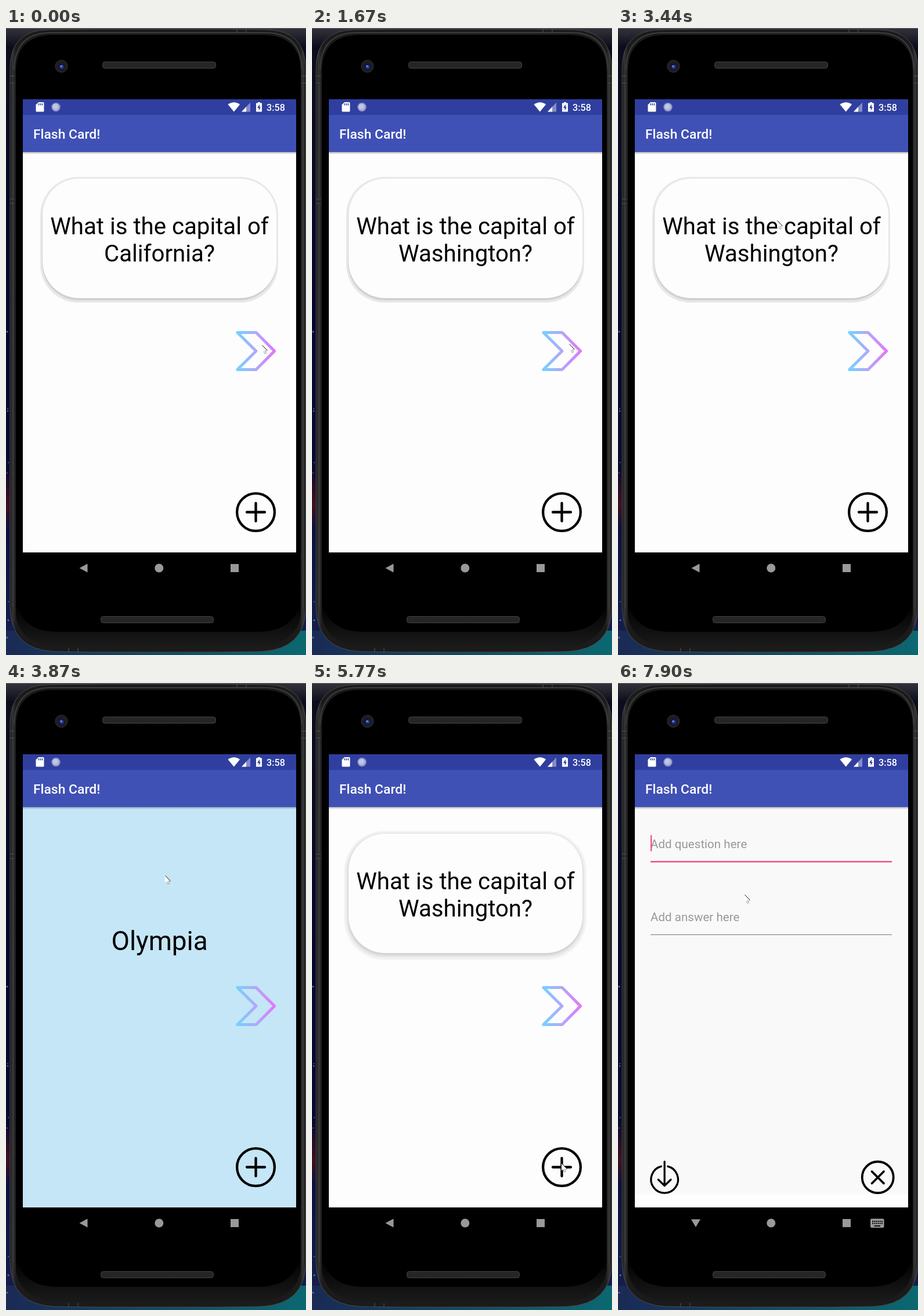
Animation, 517 px wide and 1082 px high, one loop 8 s. Source, as an HTML page:

```html
<!DOCTYPE html>
<html lang="en">
<head>
<meta charset="utf-8">
<title>Flash Card</title>
<style>
  html, body { margin: 0; width: 100%; height: 100%; overflow: hidden; background: #000; }
  svg { display: block; width: 100vw; height: 100vh; }
  text { font-family: Roboto, sans-serif; }
  .bold { font-weight: 500; fill: #fff; }
  .mid { text-anchor: middle; }
  .line { fill: none; stroke: #000; stroke-linecap: round; stroke-linejoin: round; }
</style>
</head>
<body>
<svg viewBox="0 0 517 1082" preserveAspectRatio="none">
  <defs>
    <linearGradient id="sky" x2="0" y2="1">
      <stop offset="0" stop-color="#33343a"/><stop offset=".03" stop-color="#0c0d1c"/>
      <stop offset=".45" stop-color="#06072c"/><stop offset=".7" stop-color="#080a30"/>
      <stop offset=".76" stop-color="#40101f"/><stop offset=".8" stop-color="#0b1040"/>
      <stop offset="1" stop-color="#17204f"/>
    </linearGradient>
    <linearGradient id="teal">
      <stop offset="0" stop-color="#1a2a55"/><stop offset="1" stop-color="#0b6870"/>
    </linearGradient>
    <linearGradient id="rim">
      <stop offset="0" stop-color="#151515"/><stop offset=".008" stop-color="#353535"/>
      <stop offset=".02" stop-color="#1b1b1b"/><stop offset=".98" stop-color="#1b1b1b"/>
      <stop offset=".992" stop-color="#353535"/><stop offset="1" stop-color="#151515"/>
    </linearGradient>
    <linearGradient id="chin" x2="0" y2="1">
      <stop offset="0" stop-color="#000"/><stop offset="1" stop-color="#1b1b1b"/>
    </linearGradient>
    <linearGradient id="drop" x2="0" y2="1">
      <stop offset="0" stop-color="#000" stop-opacity=".3"/><stop offset="1" stop-color="#000" stop-opacity="0"/>
    </linearGradient>
    <linearGradient id="next" gradientUnits="userSpaceOnUse" x1="397" x2="465" y1="0" y2="0">
      <stop offset="0" stop-color="#74d3fc"/><stop offset=".5" stop-color="#b0a8fb"/><stop offset="1" stop-color="#e474fb"/>
    </linearGradient>
    <pattern id="mesh" width="3" height="3" patternUnits="userSpaceOnUse">
      <rect width="3" height="3" fill="#202020"/><path d="M0 3L3 0" stroke="#343434" stroke-width=".8"/>
    </pattern>
  </defs>

  <rect width="517" height="1082" fill="url(#sky)"/>
  <path d="M0 1040H517V1082H0Z" fill="url(#teal)"/>
  <path d="M0 .5H517" stroke="#66676a"/>
  <g id="stars" fill="#8790b8"></g>

  <path d="M7 70Q7 3 74 3L160 2H380L450 3Q516 4 516.5 70V1000Q516 1072 440 1076L370 1077H150L82 1076Q8 1072 7 1000Z" fill="url(#rim)" stroke="#4b4b4b"/>
  <path d="M14 72Q15 8 78 8H446Q509 8 510 72" fill="none" stroke="#3c3c3c" stroke-width="2"/>
  <path d="M17 76Q17 13 80 12H444Q508 13 508 76V990Q506 1056 440 1062H82Q18 1056 17 990Z"/>
  <path d="M17 990V1012Q22 1062 90 1070H432Q502 1062 508 1012V990Q496 1042 434 1042H88Q28 1042 17 990Z" fill="url(#chin)"/>
  <path d="M7 83H15M7 95H15M509 83H517M509 95H517M7 295H15M7 303H15M398 2V8M414 2V8M108 1070V1076M124 1070V1076" stroke="#555"/>
  <path d="M12.5 98V292M12.5 306V1000M512 98V1000" stroke="#414141"/>

  <g fill="url(#mesh)" stroke="#434343">
    <rect x="166.5" y="58.5" width="195" height="11" rx="4"/>
    <rect x="163.5" y="1015.5" width="194" height="11" rx="4"/>
  </g>
  <circle cx="95.5" cy="66" r="10.5" fill="#1d1d20" stroke="#343438"/>
  <circle cx="95.5" cy="66.5" r="6" fill="#101943"/>
  <circle cx="96" cy="67" r="3.3" fill="#2b3d91"/>
  <circle cx="95" cy="66" r="1.3" fill="#91a7e8"/>

  <rect id="page" x="29" y="214" width="471" height="691"/>
  <rect x="29" y="123" width="471" height="27.5" fill="#303f9f"/>
  <rect x="29" y="150" width="471" height="64" fill="#3f51b5"/>
  <rect x="29" y="214" width="471" height="4" fill="url(#drop)"/>
  <text class="bold" x="47" y="191" font-size="22.9">Flash Card!</text>
  <text class="bold" x="449" y="142.5" font-size="16.2">3:58</text>

  <path d="M56 128H64Q65.500 128 65.500 129.500V143Q65.500 144.500 64 144.500H53Q51.500 144.500 51.500 143V132.500Z" fill="#fff"/>
  <path d="M56.500 130V133.500M59.500 130V133.500M62.500 130V133.500" stroke="#303f9f" stroke-width="1.500"/>
  <circle cx="86" cy="136.500" r="7" fill="#a9b0d8" stroke="#7f8ac4" stroke-width="1.500"/>
  <circle cx="85" cy="135.500" r="4.500" fill="#c2c7e1"/>
  <path d="M382.500 132Q393 124.500 403 132L392.800 144.500Z" fill="#fff"/>
  <path d="M406 144.500L421 128.500V144.500Z" fill="#838cc5"/>
  <path d="M406 144.500L414 136V144.500Z" fill="#fff"/>
  <path d="M434 128H438V129.500H441V144.500H431V129.500H434Z" fill="#fff"/>
  <path d="M437 131.500L433 138H435.700V142.500L439 136.500H437Z" fill="#303f9f"/>

  <g id="cards">
    <g id="cardA">
      <rect x="59" y="257" width="410" height="217" rx="66" fill="#e8e8e8"/>
      <rect x="62" y="262" width="404" height="208" rx="64" fill="#d2d2d2"/>
    </g>
    <g id="cardB"></g>
    <rect x="63" y="260" width="403" height="206" rx="63" fill="#fdfdfd"/>
    <g class="mid" font-size="40.200">
      <text x="264.500" y="355.500">What is the capital of</text>
      <text id="state" x="264.500" y="402.500"></text>
    </g>
  </g>
  <text id="answer" class="mid" x="264.500" y="461" font-size="45.800">Olympia</text>

  <g id="tools" class="line">
    <path d="M398.800 525.500H431L462.700 557.500L431 589.500H398.800L431 557.500Z" stroke="url(#next)" stroke-width="5"/>
    <circle cx="430.500" cy="835.500" r="32.400" stroke-width="4.300"/>
    <path d="M415 835.500H446M430.500 820V851" stroke-width="4.300"/>
  </g>

  <g id="form">
    <rect x="29" y="882" width="471" height="23" fill="#fefefe"/>
    <g font-size="20.600" fill="#999">
      <text x="56" y="285">Add question here</text>
      <text x="56" y="411">Add answer here</text>
    </g>
    <path d="M56 308.300H472" stroke="#ef3c7b" stroke-width="2.200"/>
    <path d="M56 434.300H472" stroke="#8c8c8c" stroke-width="1.200"/>
    <path id="caret" d="M57.200 262.500V290.500" stroke="#ef3c7b" stroke-width="2"/>
    <g class="line" stroke-width="3.300">
      <path d="M74.500 834.200A23.300 23.300 0 1 0 85.900 834.200M80.200 826V867M69.500 857L80.200 867.500L91 857"/>
      <circle cx="447.700" cy="853" r="27" stroke-width="3.800"/>
      <path d="M437.500 843L458 863.500M458 843L437.500 863.500" stroke-width="3.800"/>
    </g>
  </g>

  <g fill="#999">
    <path id="back"/>
    <circle cx="263.800" cy="932" r="7.500"/>
    <rect x="387" y="925" width="14" height="14"/>
    <g id="keys">
      <rect x="435" y="924.500" width="23.500" height="15.500" rx="2"/>
      <path d="M438 929H456M438 932.500H456" stroke="#000" stroke-width="2" stroke-dasharray="2 1.200"/>
      <path d="M441.500 937H452" stroke="#000" stroke-width="1.800"/>
    </g>
  </g>

  <g id="mouse">
    <path d="M0 0V12.500L3 10L5 15L7.500 14L5.500 9.500H9.500Z" fill="#fff"/>
    <path d="M.5 .5L9.300 9.300" stroke="#111" stroke-width="1"/>
    <path d="M9 10H5.500L7.500 14L5 15L3.200 10.800" fill="none" stroke="#333" stroke-width=".9" stroke-dasharray="1.400 1.200"/>
  </g>
</svg>

<script>
const LOOP = 8000;
const $ = id => document.getElementById(id);
const show = (id, on) => $(id).setAttribute("display", on ? "inline" : "none");

// Each row: start time, then the values held from there on.
const states = [[0, "California?"], [150, "Texas?"], [870, "Wyoming?"], [1670, "Washington?"]];
const screens = [[0, "card"], [3870, "answer"], [4550, "card"], [6670, "form"]];
const mouse = [
  [0, 441, 547], [1300, 442, 546], [1420, 443, 545],
  [2660, 443, 600], [2780, 441, 770], [2900, 440, 855],
  [3050, 425, 790], [3170, 365, 650], [3290, 305, 550], [3440, 274, 332],
  [4680, 309, 445], [4820, 385, 690], [4940, 440, 922], [5060, 444, 878],
  [5460, 438, 863], [5620, 432, 829], [5770, 430, 829], [6520, 359, 640],
  [6670, 305, 470], [6790, 280, 404], [6950, 274, 397], [7090, 240, 376], [7220, 218, 365]
];
const colors = { card: "#fdfdfd", answer: "#c5e6f6", form: "#f9f9f9" };

function at(rows, t) {
  let row = rows[0];
  for (const r of rows) if (r[0] <= t) row = r;
  return row;
}

function rect(x, y, w, h, r, fill) {
  return `<rect x="${x}" y="${y}" width="${w}" height="${h}" rx="${r}" fill="${fill}"/>`;
}

// Soft shadow built from shrinking layers.
let soft = "";
for (let i = 0; i <= 8; i++) {
  const g = Math.round(245 - i * 1.3 - i * i * 0.37);
  soft += rect(55 + i, 255 + i * 0.9, 418 - 2 * i, 223 - i * 2.1, 70 - i, `rgb(${g},${g},${g})`);
}
$("cardB").innerHTML = soft;

let dots = "";
for (const y of [524, 657, 661, 750, 768, 990, 1022, 1052])
  dots += `<circle cx="${2 + y % 4}" cy="${y}" r="${1 + y % 3 * 0.3}" opacity=".7"/>`;
$("stars").innerHTML = dots;

function draw(t) {
  const screen = at(screens, t)[1];
  const form = screen === "form";
  const keys = t >= 7900;
  const [, x, y] = at(mouse, t);
  $("page").setAttribute("fill", colors[screen]);
  $("state").textContent = at(states, t)[1];
  show("cards", screen === "card");
  show("cardA", t < 4550);
  show("cardB", t >= 4550);
  show("answer", screen === "answer");
  show("tools", !form);
  show("form", form);
  show("caret", t < 7090 || t >= 7620);
  show("keys", keys);
  $("back").setAttribute("d", keys ? "M126 925.5H142L134 939Z" : "M126.500 932L140.500 924.500V939.500Z");
  $("mouse").setAttribute("transform", `translate(${x} ${y})`);
}

const start = performance.now();
function tick() {
  draw((performance.now() - start) % LOOP);
  requestAnimationFrame(tick);
}
draw(0);
requestAnimationFrame(tick);
</script>
</body>
</html>
```
